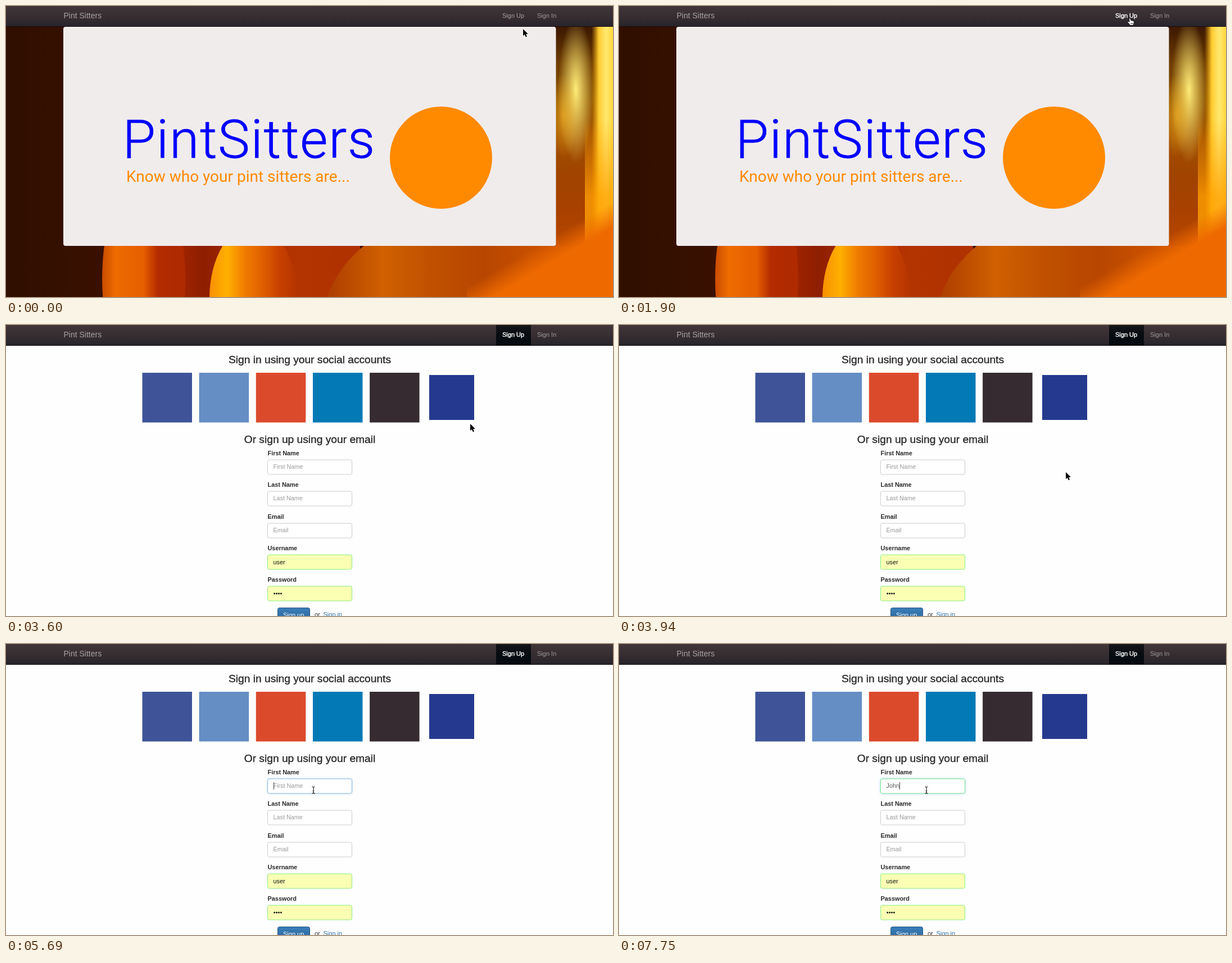
An HTML page with a canvas that plays this animation: 1080 by 518 pixels, repeating every 8 s.

```html
<!DOCTYPE html>
<html lang="en">
<head>
<meta charset="utf-8">
<title>Pint Sitters</title>
<style>
  html, body { margin: 0; width: 100%; height: 100%; overflow: hidden; background: #fefefe; }
  canvas { display: block; }
</style>
</head>
<body>
<canvas id="stage" width="1080" height="518"></canvas>
<script>
const ctx = document.getElementById('stage').getContext('2d');
const W = 1080, H = 518, LOOP = 8000, SIGNUP_AT = 2890;
const SANS = '"Liberation Sans", Arial, sans-serif';
const LIGHT = 'Roboto, "Open Sans", sans-serif';

// time, x, y, shape
const POINTER = [
  [0, 920, 41, 'arrow'], [120, 915, 33, 'arrow'], [260, 914, 30, 'arrow'],
  [350, 912, 27, 'arrow'], [440, 911, 25, 'arrow'], [800, 911, 24, 'arrow'],
  [1730, 911, 24, 'hand'], [1810, 910, 23, 'hand'], [1900, 909, 22, 'hand'],
  [3270, 852, 74, 'arrow'], [3360, 560, 125, 'hand'], [3440, 293, 136, 'hand'],
  [3520, 585, 148, 'hand'], [3600, 826, 176, 'arrow'], [3680, 814, 214, 'arrow'],
  [3780, 800, 248, 'arrow'], [3940, 795, 262, 'arrow'], [4950, 726, 263, 'arrow'],
  [5040, 652, 263, 'arrow'], [5130, 596, 261, 'beam'], [5210, 562, 260, 'beam'],
  [5300, 547, 260, 'beam']
];
const TYPED = [[0, ''], [7120, 'J'], [7300, 'Jo'], [7480, 'Joh'], [7750, 'John']];

function latest(list, t) {
  let hit = list[0];
  for (const item of list) if (item[0] <= t) hit = item;
  return hit;
}

function gradient(x0, y0, x1, y1, ...stops) {
  const g = ctx.createLinearGradient(x0, y0, x1, y1);
  stops.forEach((c, i) => g.addColorStop(i / (stops.length - 1), c));
  return g;
}

function rect(x, y, w, h, fill) {
  ctx.fillStyle = fill;
  ctx.fillRect(x, y, w, h);
}

function box(x, y, w, h, r, fill, stroke) {
  ctx.beginPath();
  ctx.roundRect(x, y, w, h, r);
  ctx.fillStyle = fill;
  ctx.fill();
  if (stroke) {
    ctx.shadowBlur = 0;
    ctx.strokeStyle = stroke;
    ctx.lineWidth = 1;
    ctx.stroke();
  }
}

function ellipse(x, y, rx, ry, fill) {
  ctx.beginPath();
  ctx.ellipse(x, y, rx, ry, 0, 0, Math.PI * 2);
  ctx.fillStyle = fill;
  ctx.fill();
}

// soft light: a radial gradient fading out to an ellipse
function light(x, y, rx, ry, rgb, alpha) {
  ctx.save();
  ctx.translate(x, y);
  ctx.scale(1, ry / rx);
  const g = ctx.createRadialGradient(0, 0, 0, 0, 0, rx);
  g.addColorStop(0, `rgba(${rgb},${alpha})`);
  g.addColorStop(1, `rgba(${rgb},0)`);
  ellipse(0, 0, rx, rx, g);
  ctx.restore();
}

function polygon(points) {
  ctx.beginPath();
  points.forEach(([x, y]) => ctx.lineTo(x, y));
  ctx.closePath();
}

function text(str, x, y, size, color, { weight = 400, family = SANS, align = 'left', bold = 0 } = {}) {
  ctx.font = `${weight} ${size}px ${family}`;
  ctx.textAlign = align;
  ctx.fillStyle = color;
  ctx.fillText(str, x, y);
  if (bold) {
    ctx.strokeStyle = color;
    ctx.lineWidth = bold;
    ctx.strokeText(str, x, y);
  }
}

function heading(str, y) {
  text(str, 540.5, y, 19.2, '#2e2a2b', { align: 'center', bold: 0.4 });
}

function navbar(active, lit) {
  rect(0, 0, W, 36, gradient(0, 0, 0, 36, '#41373a', '#372e32', '#28242b'));
  rect(0, 36, W, 1, '#141014');
  if (active) rect(872, 0, 62, 36, gradient(0, 0, 0, 36, '#15151a', '#070c11', '#040a0f'));
  text('Pint Sitters', 102.5, 22, 14, '#a8a2a4');
  text('Sign Up', 883, 20.5, 11, lit ? '#ffffff' : '#a8a2a4', { bold: lit ? 0.4 : 0 });
  text('Sign In', 945, 20.5, 11, '#a09a9c');
}

function backdrop() {
  rect(0, 0, W, H, gradient(0, 0, 170, 0, '#300e00', '#341000', '#3a1000'));

  // blurred lights along the bottom
  rect(210, 400, 420, 118, gradient(270, 0, 600, 0, '#b02a00', '#8e1e00', '#a82c00', '#b43400', '#b03200'));
  ellipse(245, 485, 74, 180, gradient(170, 0, 320, 0, '#c84a00', '#ee6c00', '#ea6400', '#e65e00', '#b42c00', '#b02a00', '#b02a00'));
  ellipse(440, 520, 78, 130, gradient(362, 0, 518, 0, '#f89000', '#ffb000', '#f07c00', '#e06000', '#c84000', '#b43400'));

  // glass
  ctx.beginPath();
  ctx.moveTo(572, H);
  ctx.quadraticCurveTo(588, 465, 645, 420);
  ctx.lineTo(W, 420);
  ctx.lineTo(W, H);
  ctx.fillStyle = gradient(580, 0, 940, 0, '#b04000', '#d06000', '#c05000', '#b84600', '#c85000');
  ctx.fill();

  // right edge
  rect(978, 37, 102, 390, gradient(0, 37, 0, 427, '#3c1800', '#6e3c00', '#8a5000', '#a05000', '#a04400', '#a84000', '#b84800'));
  light(1014, 150, 32, 130, '255,236,120', 1);
  light(992, 195, 26, 75, '255,190,40', 0.6);
  rect(1042, 37, 38, 390, gradient(1042, 0, 1080, 0, 'rgba(255,180,10,0)', '#ffcc30', '#ffe870', '#ffd840'));
  rect(1030, 200, 50, 227, gradient(0, 200, 0, 340, 'rgba(255,160,0,0)', 'rgba(255,160,0,.8)'));
  rect(820, 340, 260, 178, gradient(940, 430, 960, 464, 'rgba(238,106,0,0)', '#ee6a00'));
}

function homePage(t) {
  backdrop();
  navbar(false, t >= 1730);
  box(102, 37, 876.5, 390, 4, '#f0ecec');
  ctx.letterSpacing = '1.8px';
  text('PintSitters', 207.5, 270, 95, '#0000ff', { weight: 300, family: LIGHT, bold: 0.8 });
  ctx.letterSpacing = '0px';
  text('Know who your pint sitters are...', 214, 313, 28, '#ff8a00', { family: LIGHT });
  ellipse(774, 270, 91, 91, '#ff8a00');
}

function mix(a, b, k) {
  return 'rgb(' + a.map((v, i) => Math.round(v + (b[i] - v) * k)).join(',') + ')';
}

function firstField(t) {
  const grey = [204, 204, 204], blue = [102, 175, 233], green = [112, 230, 140];
  const ease = start => Math.min(1, Math.max(0, (Math.floor((t - start) / 100) + 1) / 3));
  const focus = ease(5570), valid = ease(7120);
  const border = valid ? mix(blue, green, valid) : mix(grey, blue, focus);
  const typed = latest(TYPED, t)[1];

  ctx.save();
  if (focus) {
    ctx.shadowColor = `rgba(102,175,233,${0.6 * focus})`;
    ctx.shadowBlur = 5;
  }
  box(465.5, 240, 150, 26, 3, '#ffffff', border);
  ctx.restore();

  text(typed || 'First Name', 475.5, 256, 10.8, typed ? '#555555' : '#999999');
  const caretOn = t >= 5570 && (t < 6130 || t >= 6580);
  if (caretOn) rect(Math.round(475.5 + (typed ? ctx.measureText(typed).width : 0)), 246, 1, 13, '#444444');
}

function signupPage(t) {
  rect(0, 0, W, H, '#fefefe');
  navbar(true, true);
  heading('Sign in using your social accounts', 68);
  ['#3f5498', '#658ec5', '#dc4a2c', '#0379b5', '#352b30'].forEach((c, i) =>
    rect(242.5 + i * 101.15, 85, 88.5, 88.5, c));
  rect(753, 89, 80, 80, '#253a8e');
  heading('Or sign up using your email', 210);

  ['First Name', 'Last Name', 'Email', 'Username', 'Password'].forEach((name, i) => {
    const y = i * 56.3;
    text(name, 465.5, 232 + y, 10.9, '#2b2829', { weight: 700 });
    if (!i) return firstField(t);
    const filled = i > 2;
    box(465.5, Math.round(240 + y), 150, 26, 3, filled ? '#faffb4' : '#ffffff', filled ? '#8aec80' : '#cccccc');
    if (!filled) text(name, 475.5, 256 + y, 10.8, '#999999');
  });
  text('user', 475.5, 425.5, 10.8, '#111111');
  for (let i = 0; i < 4; i++) ellipse(477.7 + i * 3.9, 478, 1.5, 1.5, '#111111');

  box(483.5, 503.5, 57, 28, 3, gradient(0, 503, 0, 530, '#3a7fba', '#2b6296'), '#27577f');
  text('Sign up', 493, 520, 11, '#ffffff');
  text('or', 549, 519, 11, '#333333');
  text('Sign in', 564.5, 519, 11, '#3072aa');
}

const shapes = {
  arrow() {
    polygon([[0, 0], [0, 12.2], [2.8, 9.7], [4.8, 14.3], [7, 13.4], [5.1, 8.9], [8.8, 8.7]]);
    ctx.lineJoin = 'round';
    ctx.strokeStyle = '#ffffff';
    ctx.lineWidth = 1.8;
    ctx.stroke();
    ctx.fillStyle = '#000000';
    ctx.fill();
  },
  hand() {
    polygon([[-1.2, 0.4], [0.4, 0], [1.5, 4.2], [3, 3.9], [4.2, 4.7], [5.6, 4.6], [7, 6],
      [6.8, 9], [5.8, 12], [0.4, 12], [-1.6, 9], [-3.9, 6.7], [-3, 5.6], [-0.3, 7]]);
    ctx.lineJoin = 'round';
    ctx.strokeStyle = '#000000';
    ctx.lineWidth = 1.7;
    ctx.stroke();
    ctx.fillStyle = '#ffffff';
    ctx.fill();
    for (const x of [1.5, 3.2, 4.9]) rect(x, 8, 0.7, 2.7, '#000000');
  },
  beam() {
    ctx.beginPath();
    for (const s of [-1, 1]) {
      ctx.moveTo(-2.7, 6 * s);
      ctx.quadraticCurveTo(0, 6 * s, 0, 4 * s);
      ctx.quadraticCurveTo(0, 6 * s, 2.7, 6 * s);
    }
    ctx.moveTo(0, -5);
    ctx.lineTo(0, 5);
    ctx.moveTo(-1.5, 1.5);
    ctx.lineTo(1.5, 1.5);
    ctx.strokeStyle = '#222222';
    ctx.lineWidth = 1.1;
    ctx.stroke();
  }
};

function pointer(t) {
  const [, x, y, kind] = latest(POINTER, t);
  ctx.save();
  ctx.translate(x, y);
  shapes[kind]();
  ctx.restore();
}

function draw(now) {
  const t = now % LOOP;
  if (t < SIGNUP_AT) homePage(t);
  else signupPage(t);
  pointer(t);
}

const start = performance.now();
function tick() {
  draw(performance.now() - start);
  requestAnimationFrame(tick);
}
tick();
</script>
</body>
</html>
```
